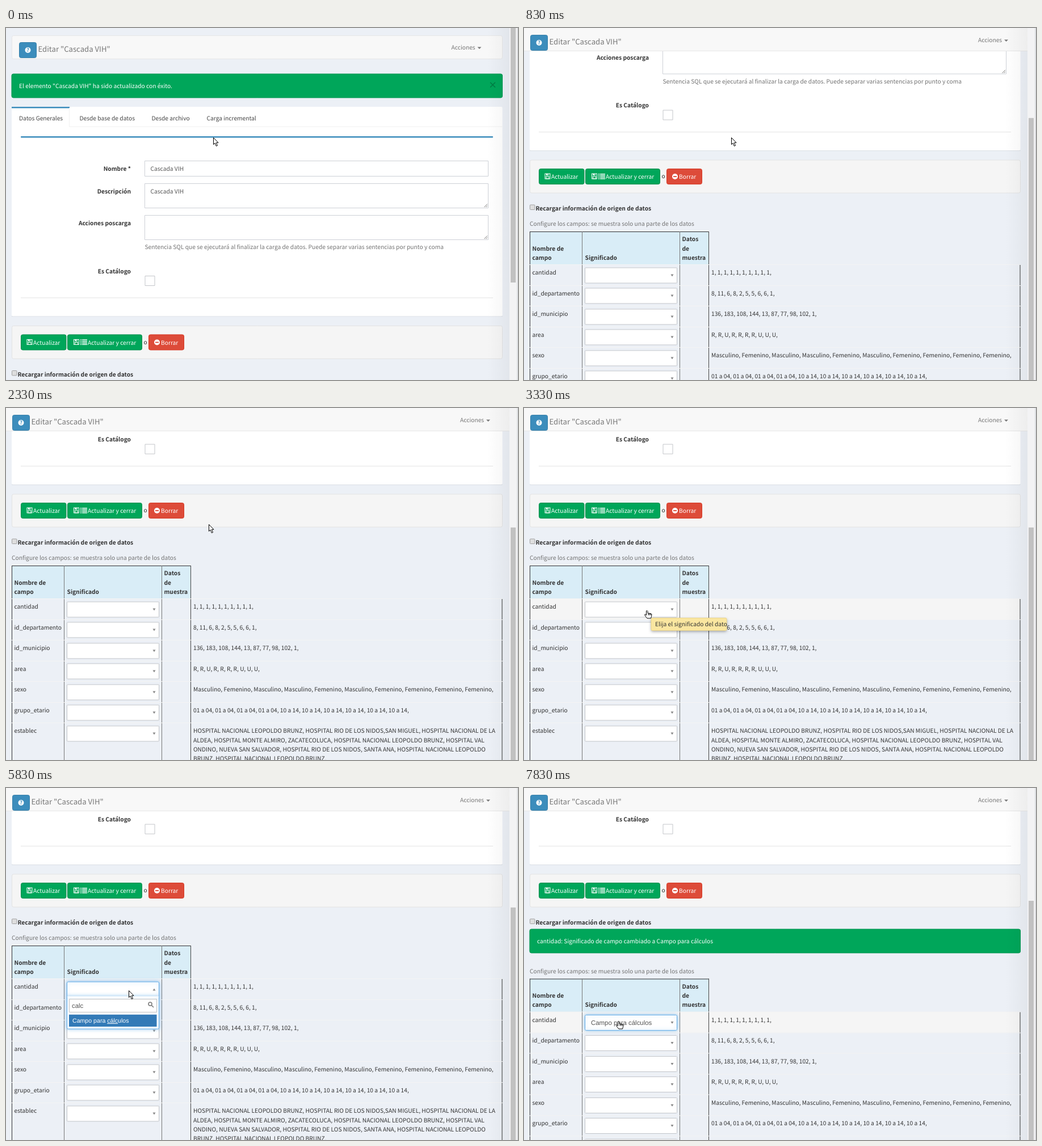
Animation, 902 px wide and 621 px high, one loop 8 s. Source, as an HTML page with a canvas:

```html
<!DOCTYPE html>
<html lang="es">
<head>
<meta charset="utf-8">
<title>Editar</title>
<style>
html, body { margin: 0; width: 100%; height: 100%; overflow: hidden; background: #ecf0f6; }
canvas { display: block; }
</style>
</head>
<body>
<canvas id="stage" width="902" height="621"></canvas>
<script>
const ctx = document.getElementById('stage').getContext('2d');
const W = 902, H = 621, LOOP = 8000;
const SANS = '"Noto Sans CJK JP", "Noto Sans CJK SC", "Noto Sans CJK", sans-serif';
const ARIAL = '"Liberation Sans", Arial, sans-serif';
const BODY = 10.24, TITLE = 13.15;
const BLUE = '#3c8dbc', GREEN = '#00a65a', RED = '#dd4b39';
const ROW = 36.57, LINE = 16.33, TABLE = 651.5, HEAD = 58.5, NOTICE = 58.5;

const ROWS = [
  ['cantidad', '1, '.repeat(10)],
  ['id_departamento', '8, 11, 6, 8, 2, 5, 5, 6, 6, 1,'],
  ['id_municipio', '136, 183, 108, 144, 13, 87, 77, 98, 102, 1,'],
  ['area', 'R, R, U, R, R, R, R, U, U, U,'],
  ['sexo', 'Masculino, Femenino, Masculino, Masculino, Femenino, Masculino, Femenino, Femenino, Femenino, Femenino,'],
  ['grupo_etario', '01 a 04, '.repeat(4) + '10 a 14, '.repeat(6)],
  ['establec',
    'HOSPITAL NACIONAL LEOPOLDO BRUNZ, HOSPITAL RIO DE LOS NIDOS,SAN MIGUEL, HOSPITAL NACIONAL DE LA',
    'ALDEA, HOSPITAL MONTE ALMIRO, ZACATECOLUCA, HOSPITAL NACIONAL LEOPOLDO BRUNZ, HOSPITAL VAL',
    'ONDINO, NUEVA SAN SALVADOR, HOSPITAL RIO DE LOS NIDOS, SANTA ANA, HOSPITAL NACIONAL LEOPOLDO',
    'BRUNZ, HOSPITAL NACIONAL LEOPOLDO BRUNZ,']
];
const OPTIONS = ['Año', 'Área geográfica', 'Campo para cálculos', 'Código de departamento',
  'Código de establecimiento', 'Código de municipio', 'Edad', 'Fecha'];

// Timelines: [start ms, value...]
const SCROLL = [[0, 0], [330, 50], [500, 121], [670, 207], [830, 292.5], [1000, 315], [1170, 335], [1330, 350], [1500, 373.5]];
const POINTER = [
  [0, 365, 193, arrow], [2330, 357, 205, arrow], [2500, 322, 250, arrow], [2670, 268, 312, arrow],
  [2830, 224, 362, hand], [3000, 217, 357, hand], [3830, 216, 357, arrow],
  [6670, 208, 365, arrow], [6830, 190, 382, arrow], [7000, 172, 397, arrow], [7330, 167, 411, hand]
];
const TYPED = [[0, ''], [5170, 'c'], [5330, 'ca'], [5500, 'calc']];
const CARET = [[0, true], [4830, false], [5170, true], [5830, false], [6670, true], [7330, false]];
const HOVER = [[0, false], [2830, true], [3830, false], [7830, true]];

const at = (track, t) => track.findLast(k => k[0] <= t);
const within = (t, a, b) => t >= a && t < b;

function text(s, x, y, color = '#333', { size = BODY, bold = false, family = SANS, align = 'left' } = {}) {
  ctx.font = `${bold ? 'bold ' : ''}${size}px ${family}`;
  ctx.textAlign = align;
  ctx.fillStyle = color;
  ctx.fillText(s, x, y);
}

function rect(x, y, w, h, color) {
  ctx.fillStyle = color;
  ctx.fillRect(x, y, w, h);
}

function box(x, y, w, h, fill, border, r = 0) {
  ctx.beginPath();
  ctx.roundRect(x, y, w, h, r);
  if (fill) { ctx.fillStyle = fill; ctx.fill(); }
  if (border) { ctx.strokeStyle = border; ctx.lineWidth = 1; ctx.stroke(); }
}

function poly(points, fill, stroke) {
  ctx.beginPath();
  points.forEach(([x, y]) => ctx.lineTo(x, y));
  ctx.closePath();
  if (fill) { ctx.fillStyle = fill; ctx.fill(); }
  if (stroke) { ctx.strokeStyle = stroke; ctx.lineWidth = 1; ctx.lineJoin = 'round'; ctx.stroke(); }
}

function disc(x, y, r, color) {
  ctx.beginPath();
  ctx.arc(x, y, r, 0, 7);
  ctx.fillStyle = color;
  ctx.fill();
}

function glow(draw) {
  ctx.save();
  ctx.shadowColor = 'rgba(102,175,233,.7)';
  ctx.shadowBlur = 6;
  draw();
  ctx.restore();
}

function arrow(x, y) {
  ctx.save();
  ctx.translate(x, y);
  poly([[.5, .5], [.5, 12.5], [3.2, 10], [5.3, 15.3], [7.5, 14.4], [5.3, 9.3], [9, 9.3]], '#fff', '#000');
  ctx.restore();
}

function hand(x, y) {
  ctx.save();
  ctx.translate(x - 5, y);
  poly([[3.5, 1], [5, .5], [6, 1.5], [6, 5], [11, 5.5], [13, 7], [12.5, 10.5], [11.5, 14], [5, 14],
    [2, 10.5], [.5, 7.5], [1.5, 6.8], [3.5, 8.5]], '#fff', '#000');
  [7, 9, 11].forEach(px => rect(px - .5, 5.5, 1, 3, '#000'));
  ctx.restore();
}

function header(stuck) {
  if (stuck) {
    rect(0, 0, 887, 41, '#f8f8f8');
    rect(0, 40, 887, 1, '#e7e7e7');
  } else box(10.5, 13.5, 864, 41, '#f8f8f8', '#e7e7e7', 3);
  const dx = stuck ? -12 : 0, dy = stuck ? -13 : 0;
  box(23.5 + dx, 25.5 + dy, 30, 27, BLUE, '#367fa9', 3);
  disc(38.5 + dx, 39 + dy, 5, '#fff');
  text('?', 38.5 + dx, 42.3 + dy, BLUE, { size: 9, bold: true, align: 'center' });
  text('Editar "Cascada VIH"', 56.5 + dx, 42 + dy, '#777', { size: TITLE });
  const ax = stuck ? 800 : 784.5;
  text('Acciones', ax, 38 + dy, '#777');
  poly([[ax + 46, 33.5 + dy], [ax + 53, 33.5 + dy], [ax + 49.5, 37 + dy]], '#777');
}

function alertBox(y, message) {
  box(10, y, 864.5, 42, GREEN, '#009551', 3);
  text(message, 23, y + 25, '#fff');
}

function field(y, h, value) {
  box(244.5, y, 605, h, '#fff', '#cdd0d6');
  if (value) text(value, 254.5, y + 17.5, '#555');
  if (h < 40) return;
  ctx.strokeStyle = '#777';
  ctx.beginPath();
  [6, 3].forEach(d => { ctx.moveTo(848.5 - d, y + h - 1.5); ctx.lineTo(848, y + h - 1 - d); });
  ctx.stroke();
}

function floppy(x, y) {
  ctx.strokeStyle = '#fff';
  ctx.lineWidth = 1;
  ctx.strokeRect(x + .5, y + .5, 9, 9);
  ctx.strokeRect(x + 2.5, y + 5.5, 5, 4);
  rect(x + 2.5, y + .5, 4.5, 3.2, '#fff');
  rect(x + 5, y + 1, 1.2, 2, GREEN);
}

function buttons() {
  box(10.5, 525.5, 864, 58, '#f5f5f5', '#e3e3e3', 3);
  box(26.5, 541, 79.5, 27, GREEN, '#008d4c', 3);
  floppy(36.5, 549);
  text('Actualizar', 48, 558.5, '#fff');
  box(108.5, 541, 131, 27, GREEN, '#008d4c', 3);
  floppy(119, 549);
  for (let i = 0; i < 4; i++) {
    rect(131, 549.5 + i * 2.7, 2, 1.5, '#fff');
    rect(134, 549.5 + i * 2.7, 9, 1.5, '#fff');
  }
  text('Actualizar y cerrar', 144, 558.5, '#fff');
  text('o', 242.5, 557.5);
  box(251.5, 541, 62, 27, RED, '#d73925', 3);
  disc(266, 554.5, 5, '#fff');
  rect(263, 553.7, 6, 1.8, RED);
  text('Borrar', 273, 558.5, '#fff');
}

function form() {
  alertBox(81, 'El elemento "Cascada VIH" ha sido actualizado con éxito.');
  text('×', 857.5, 106, 'rgba(0,0,0,.25)', { size: 15, bold: true, align: 'center' });

  rect(10, 508, 864.5, 1.2, '#d5d9df');
  box(10, 139, 864.5, 369.5, '#fff', null, 2);
  rect(10, 173.5, 864.5, 1, '#f1f1f1');
  rect(10, 173, 101, 2, '#fff');
  rect(10, 139, 102, 2.5, BLUE);
  rect(111, 141, 1, 33, '#f1f1f1');
  [['Datos Generales', 23], ['Desde base de datos', 129.5], ['Desde archivo', 256.5], ['Carga incremental', 353.5]]
    .forEach(([s, x]) => text(s, x, 163, '#444'));

  box(26, 191, 832, 2.5, BLUE, null, 1);
  rect(26, 475.5, 832, 1, '#e4e4e4');
  [['Nombre *', 252], ['Descripción', 292], ['Acciones poscarga', 348], ['Es Catálogo', 432.5]]
    .forEach(([s, y]) => text(s, 220, y, '#333', { bold: true, align: 'right' }));
  field(234.5, 27, 'Cascada VIH');
  field(274.5, 43, 'Cascada VIH');
  field(330.5, 43);
  text('Sentencia SQL que se ejecutará al finalizar la carga de datos. Puede separar varias sentencias por punto y coma',
    244.5, 390, '#737373');
  box(245, 437.5, 17, 17, '#fff', '#c4c6ca');

  buttons();
  box(10.5, 604.5, 8.5, 8.5, '#dedede', '#a3a3a3', 1);
  text('Recargar información de origen de datos', 20.5, 614.5, '#333', { bold: true });
}

function select(y, { value = '', focus = false, open = false } = {}) {
  const draw = () => box(107.5, y, 162, 27, '#fff', focus ? '#66afe9' : '#c2c5ca', focus ? 2 : 1);
  focus ? glow(draw) : draw();
  if (value) text(value, 118, y + 17, '#555', { size: 11.43, family: ARIAL });
  const d = open ? -2 : 2;
  poly([[258.5, y + 13.5 - d], [263.5, y + 13.5 - d], [261, y + 13.5 + d]], '#888');
}

function table(hover, chosen, open) {
  const end = TABLE + HEAD;
  text('Configure los campos: se muestra solo una parte de los datos', 10, 641.5, '#737373');
  rect(10, TABLE, 316, HEAD, '#d9edf7');
  rect(10, TABLE, 316, 1, '#333');
  const bold = { bold: true };
  text('Nombre de', 14.5, TABLE + 33.5, '#333', bold);
  text('campo', 14.5, TABLE + 49.8, '#333', bold);
  text('Significado', 107.5, TABLE + 49.8, '#333', bold);
  ['Datos', 'de', 'muestra'].forEach((s, i) => text(s, 278.5, TABLE + 17.2 + i * LINE, '#333', bold));

  if (hover) rect(10, end, 864, ROW, '#f5f5f5');
  [[10, '#333'], [102, '#777'], [274, '#777'], [325, '#444']]
    .forEach(([x, c]) => rect(x, TABLE, 1, 400, c));
  rect(873.5, end, 1, 340, '#333');

  ROWS.forEach(([name, ...lines], i) => {
    const y = end + i * ROW;
    rect(10, Math.round(y) - .5, 865, 1, '#f4f4f4');
    text(name, 14.5, y + 17.5);
    lines.forEach((s, n) => text(s.trimEnd(), 330, y + 17.5 + n * LINE));
    const first = i === 0;
    select(Math.round(y + 4.5) + .5, { value: first ? chosen : '', focus: first && (open || !!chosen), open: first && open });
  });
}

const plain = s => s.normalize('NFD').replace(/[\u0300-\u036f]/g, '').toLowerCase();

function dropdown(typed, caret) {
  const found = OPTIONS.filter(s => plain(s).includes(typed));
  const step = 21.6, listH = Math.min(163, found.length * step);
  glow(() => box(107.5, 368.5, 162, 399.5 + listH + 4 - 368.5, '#fff', '#66afe9', [0, 0, 2, 2]));
  rect(108, 367.5, 161, 2, '#fff');
  box(111.5, 372.5, 154, 23, '#fff', '#c0c0c0');
  text(typed, 116, 388, '#555', { size: 11.43, family: ARIAL });
  if (caret) rect(116 + ctx.measureText(typed).width, 377, 1, 13, '#333');
  ctx.strokeStyle = '#777';
  ctx.lineWidth = 1.5;
  ctx.beginPath();
  ctx.arc(254, 381, 3, 0, 7);
  ctx.moveTo(256.3, 383.3);
  ctx.lineTo(260, 387);
  ctx.stroke();

  ctx.save();
  ctx.beginPath();
  ctx.rect(108, 399.5, 161, listH);
  ctx.clip();
  found.forEach((s, i) => {
    const y = 399.5 + i * step, color = i ? '#555' : '#fff';
    if (!i) rect(111, y, 154.5, step, '#337ab7');
    text(s, 117, y + 14.5, color, { size: 10.6, family: ARIAL });
    const start = plain(s).indexOf(typed);
    const width = part => ctx.measureText(part).width;
    rect(117 + width(s.slice(0, start)), y + 15.5, width(s.substr(start, typed.length)), 1, color);
  });
  ctx.restore();
}

function tooltip() {
  ctx.save();
  ctx.shadowColor = 'rgba(0,0,0,.35)';
  ctx.shadowBlur = 5;
  ctx.shadowOffsetY = 2;
  box(224, 370.5, 133, 22, '#fae6a0', null, 2);
  ctx.restore();
  box(224, 370.5, 133, 22, null, '#ead58c', 2);
  text('Elija el significado del dato', 231, 385);
}

function scrollbar(scroll, notice) {
  const shade = ctx.createLinearGradient(848, 0, 887, 0);
  shade.addColorStop(0, 'rgba(0,0,0,0)');
  shade.addColorStop(1, 'rgba(0,0,0,.045)');
  rect(848, 0, 39, H, shade);
  rect(887, 0, 15, H, '#f3f3f4');
  const top = notice ? 199 : -29 + scroll * .642;
  rect(889, top, 9, 478, '#c1c1c1');
  rect(900, 0, 2, H, '#dcdde0');
}

function render(t) {
  const scroll = at(SCROLL, t)[1];
  const open = within(t, 3670, 7670), notice = t >= 7830;
  rect(0, 0, W, H, '#ecf0f6');
  ctx.save();
  ctx.translate(0, -scroll);
  form();
  if (notice) {
    alertBox(622.5, 'cantidad: Significado de campo cambiado a Campo para cálculos');
    ctx.translate(0, NOTICE);
  }
  table(at(HOVER, t)[1], t >= 7670 ? OPTIONS[2] : '', open);
  ctx.restore();
  header(scroll > 13);
  if (open) dropdown(at(TYPED, t)[1], at(CARET, t)[1]);
  scrollbar(scroll, notice);
  if (within(t, 3330, 3670)) tooltip();
  const [, x, y, pointer] = at(POINTER, t);
  pointer(x, y);
}

ctx.textRendering = 'geometricPrecision';
const start = performance.now();
function frame() {
  render((performance.now() - start) % LOOP);
  requestAnimationFrame(frame);
}
frame();
</script>
</body>
</html>
```
